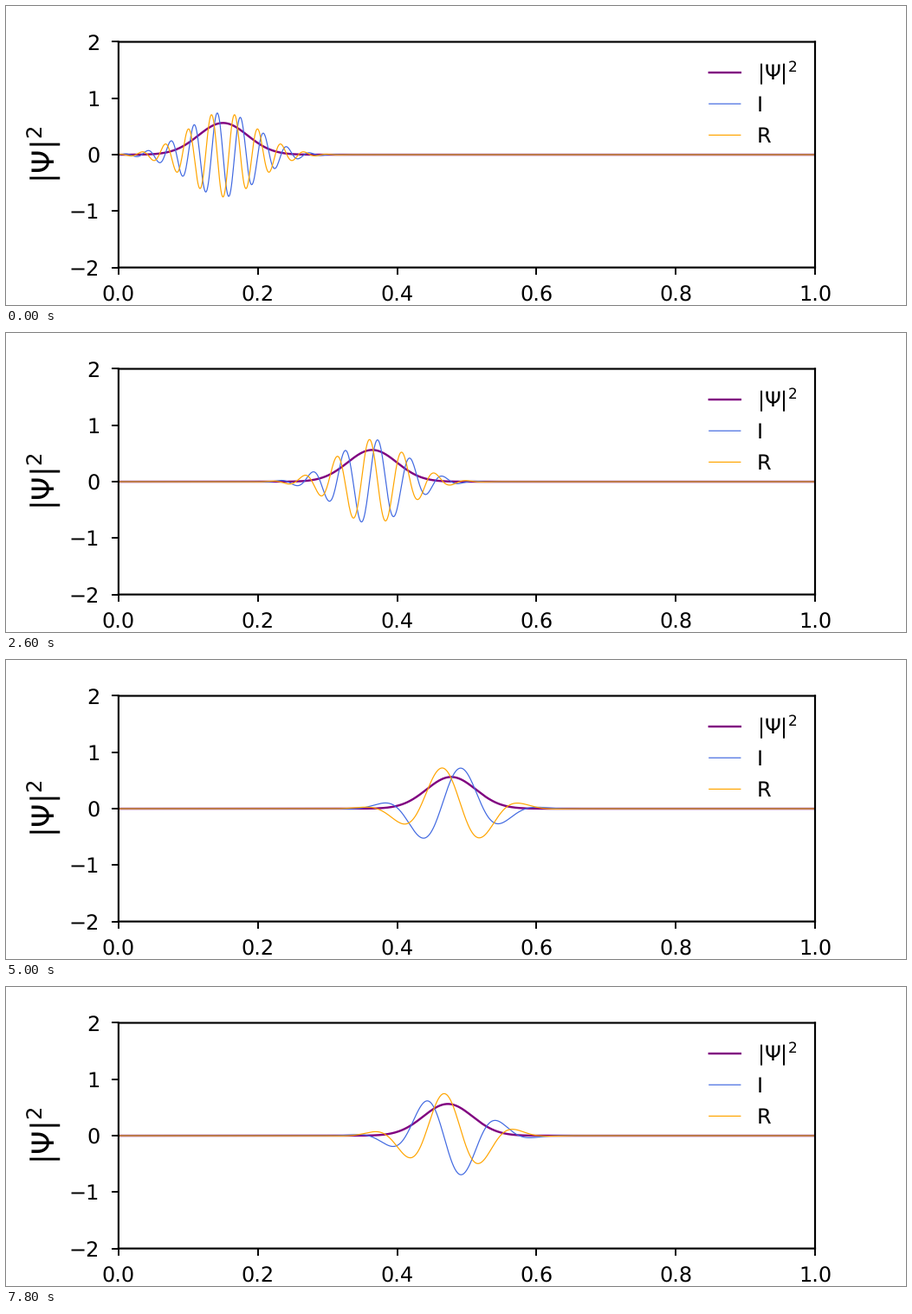
Recreate the animation shown at these times as a matplotlib script. Size 1039x346 px, loop 8 s.

```python
import numpy as np
import matplotlib.pyplot as plt
from matplotlib.animation import FuncAnimation

W, H, DPI = 1039, 346, 173
FRAMES, INTERVAL = 40, 200

# Gaussian packet in a harmonic well centred on x = 0
AMP, WIDTH = 0.75, 0.05
X0, K0 = 0.15, 60 * np.pi
OMEGA = 0.04                      # radians per frame
STIFF = 1 / WIDTH**2
x = np.linspace(0, 1, 1001)

plt.rcParams.update({"path.snap": False, "text.hinting": "none"})


def packet(n):
    """Wave function of the coherent state after n steps."""
    c, s = np.cos(OMEGA * n), np.sin(OMEGA * n)
    q = X0 * c + K0 / STIFF * s
    p = K0 * c - STIFF * X0 * s
    phase = p * (x - q) + (p * q + K0 * X0 - OMEGA * n) / 2
    return AMP * np.exp(-(x - q)**2 * STIFF / 2 + 1j * phase)


fig = plt.figure(figsize=((W + 0.001) / DPI, (H + 0.001) / DPI), dpi=DPI)
left, right, top, bottom = 129.9, 934, 41.5, 302.6
ax = fig.add_axes([left / W, 1 - bottom / H,
                   (right - left) / W, (bottom - top) / H])
ax.set(xlim=(0, 1), ylim=(-2, 2),
       xticks=np.linspace(0, 1, 6), yticks=range(-2, 3))
ax.tick_params(axis="x", pad=5)
ax.tick_params(axis="y", pad=5.5)
ax.set_ylabel(r"$|\Psi|^2$", fontsize=14.5, labelpad=2.75)
for spine in ax.spines.values():
    spine.set_linewidth(0.9)

# Legend, laid out in stage pixels
stage = fig.add_axes([0, 0, 1, 1])
stage.set(xlim=(0, W), ylim=(H, 0))
stage.axis("off")


def add_curve(row, label, color, lw):
    y = 77 + 36.2 * row
    stage.plot([811.8, 847.8], [y, y], color=color, lw=lw)
    stage.text(867, y + 8.4, label, va="baseline")
    return ax.plot([], [], color=color, lw=lw)[0]


density = add_curve(0, r"$|\Psi|^2$", "purple", 1)
imag = add_curve(1, "I", "royalblue", 0.5)
real = add_curve(2, "R", "orange", 0.5)


def update(n):
    psi = packet(n)
    density.set_data(x, np.abs(psi)**2)
    imag.set_data(x, psi.imag)
    real.set_data(x, psi.real)
    return density, imag, real


anim = FuncAnimation(fig, update, frames=FRAMES, interval=INTERVAL,
                     repeat=True, repeat_delay=0)
plt.show()
```
